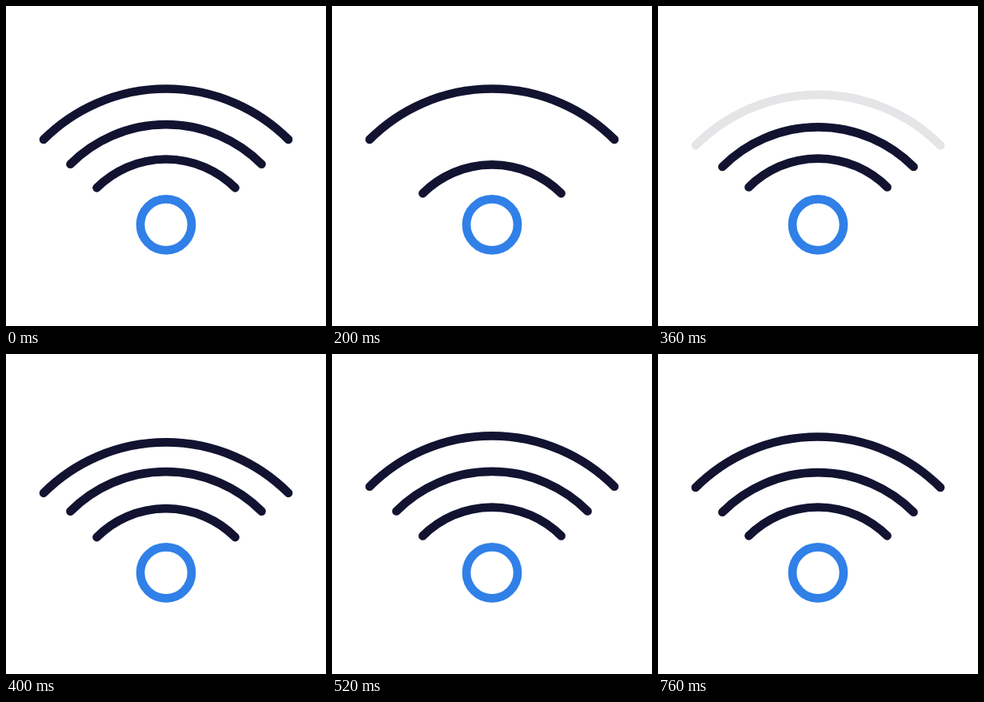
An HTML page that plays this animation: 400 px wide and 400 px high, repeating every 840 ms.

```html
<!DOCTYPE html>
<html lang="en">
<head>
<meta charset="utf-8">
<title>Wireless signal</title>
<style>
  html, body { margin: 0; width: 100%; height: 100%; overflow: hidden; background: #fff; }
  svg { display: block; width: 100vw; height: 100vh; }
</style>
</head>
<body>
<svg viewBox="0 0 400 400" fill="none" stroke-width="10.7" stroke-linecap="round">
  <g id="arcs" stroke="#121331"></g>
  <circle cx="200" cy="273.3" r="32" stroke="#3080e8"/>
</svg>
<script>
const LOOP = 840, STEP = 40, DROP = 7.3;

// Quarter-circle arcs: half width, top edge of the curve, start delay in ms
const arcs = [
  { half: 86.5, top: 191.5, delay: 0 },
  { half: 119.5, top: 148.2, delay: 80 },
  { half: 153, top: 103.5, delay: 200 }
];

const group = document.getElementById("arcs");
for (const arc of arcs) {
  const r = arc.half * Math.SQRT2;
  const y = arc.top + r - arc.half;
  arc.el = document.createElementNS("http://www.w3.org/2000/svg", "path");
  arc.el.setAttribute("d",
    `M${200 - arc.half} ${y}A${r} ${r} 0 0 1 ${200 + arc.half} ${y}`);
  group.append(arc.el);
}

const clamp = x => Math.min(1, Math.max(0, x));

// Drop down, then spring back up with a fading wobble
function offset(t) {
  if (t <= 0) return 0;
  if (t < 80) return DROP * (1 - (1 - t / 80) ** 2.5);
  if (t < 196) return DROP;
  const wobble = s => -4.2 * clamp(1 - (s - 235) / 300) * Math.cos((s - 235) / 105 * 2 * Math.PI);
  if (t < 235) {
    const p = (t - 196) / 39;
    return DROP + (wobble(235) - DROP) * p * p * (3 - 2 * p);
  }
  return wobble(t);
}

function opacity(t) {
  return t < 140 ? clamp((120 - t) / 40) : clamp((t - 155.6) / 40);
}

function draw(time) {
  const t = Math.min(760, Math.floor((time % LOOP) / STEP) * STEP);
  for (const { el, delay } of arcs) {
    el.setAttribute("transform", `translate(0 ${offset(t - delay).toFixed(2)})`);
    el.setAttribute("opacity", opacity(t - delay).toFixed(3));
  }
}

const start = performance.now();
function tick() {
  draw(performance.now() - start);
  requestAnimationFrame(tick);
}
tick();
</script>
</body>
</html>
```
